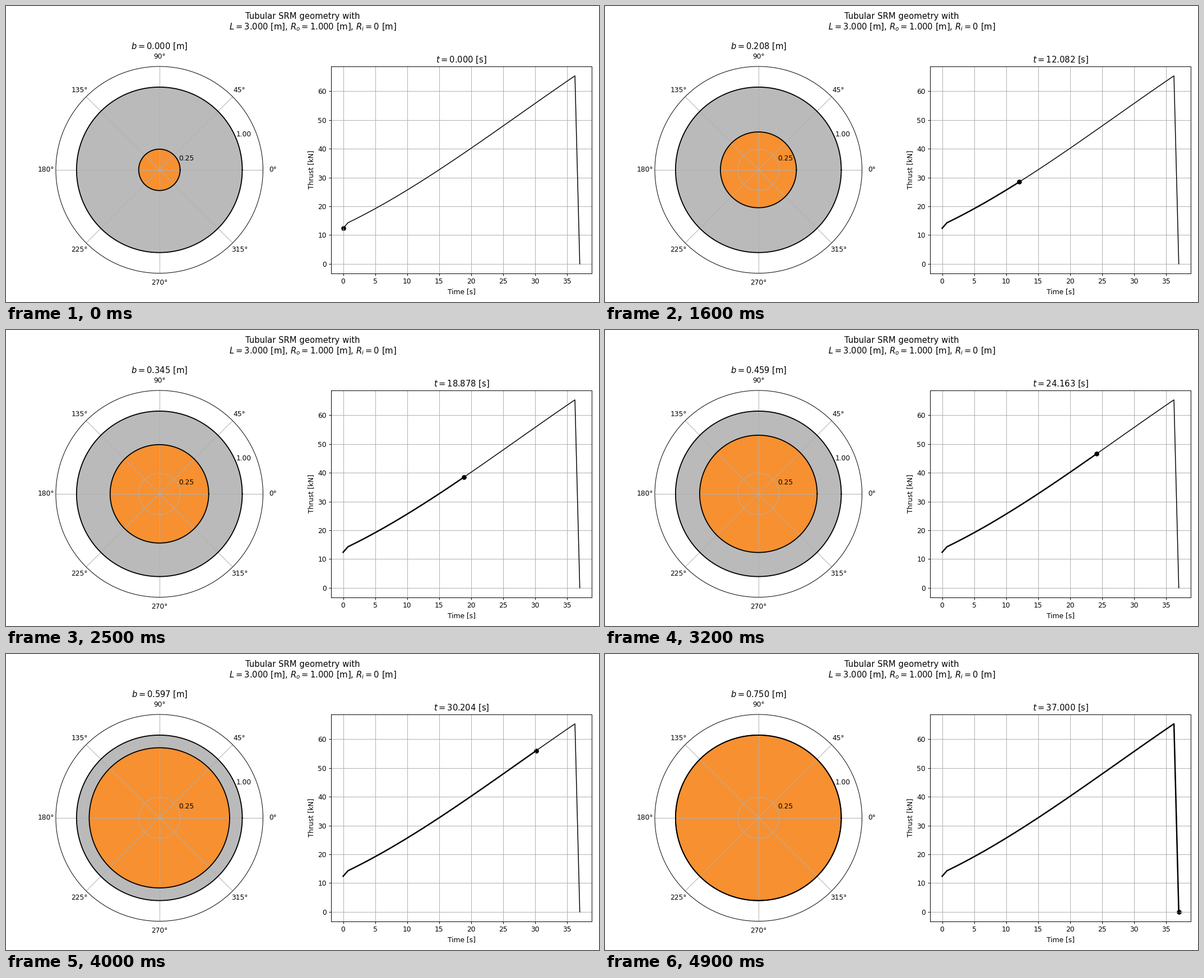
These frames come from a looping animation (1058 px wide and 529 px high, 5 s). A matplotlib script:

```python
import numpy as np
import matplotlib.pyplot as plt
from matplotlib.animation import FuncAnimation

W, H = 1058, 529
FRAMES = 50
T_END = 37.0
R_PORT, R_OUT = 0.25, 1.0
GREY, ORANGE = "#bababa", "#f79030"

plt.rcParams["font.family"] = "DejaVu Sans"


def curve(t, values, deg, at):
    """Evaluate a polynomial fitted through a few points."""
    return np.polyval(np.polyfit(np.array(t) / T_END, values, deg), at / T_END)


# burn time, thrust and burnt depth
time = np.linspace(0, T_END, FRAMES)

thrust = curve(time[[1, 8, 16, 25, 32, 40, 48]],
               [14.27, 20.5, 28.5, 38.45, 46.6, 56.1, 65.35], 3, time)
thrust[0], thrust[-1] = 12.37, 0.0

depth = curve(time[[0, 8, 16, 25, 32, 40, 48]],
              [0, 0.0983, 0.2083, 0.3448, 0.4589, 0.5972, 0.742], 6, time)
depth[0], depth[-1] = 0.0, R_OUT - R_PORT

fig = plt.figure(figsize=(12, 6), dpi=W / 12)
fig.suptitle("Tubular SRM geometry with\n"
             "        $L = 3.000$ [m], $R_o = 1.000$ [m], $R_i = 0$ [m]")


def add_axes(x, y, w, h, **kw):
    """Axes from a pixel box measured from the top left."""
    return fig.add_axes([x / W, 1 - (y + h) / H, w / W, h / H], **kw)


# grain cross-section
grain = add_axes(88.9, 108, 369.6, 369.6, projection="polar")
theta = np.linspace(0, 2 * np.pi, 361)
ring = np.ones_like(theta)
grain.fill(theta, R_OUT * ring, color=GREY, lw=0)
(port,) = grain.fill(theta, R_PORT * ring, color=ORANGE, lw=0)
grain.plot(theta, R_OUT * ring, "k", lw=1.5)
(edge,) = grain.plot(theta, R_PORT * ring, "k", lw=1.5)
grain.set_ylim(0, 1.25)
grain.set_yticks([R_PORT, R_OUT])
grain.grid(True)

# thrust history
chart = add_axes(580.4, 108, 464.4, 369.6)
chart.plot(time, thrust, "k", lw=1.2)
(trail,) = chart.plot([], [], "k", lw=2)
dot = chart.scatter([time[0]], [thrust[0]], c="k")
chart.set_xlim(-0.05 * T_END, 1.05 * T_END)
chart.set_ylim(-0.05 * thrust.max(), 1.05 * thrust.max())
chart.set_xlabel("Time [s]")
chart.set_ylabel("Thrust [kN]")
chart.grid(True)

grain_title = grain.set_title("")
chart_title = chart.set_title("")


def update(i):
    r = (R_PORT + depth[i]) * ring
    port.set_xy(np.column_stack([theta, r]))
    edge.set_data(theta, r)
    trail.set_data(time[:i + 1], thrust[:i + 1])
    dot.set_offsets([[time[i], thrust[i]]])
    grain_title.set_text(f"$b = {depth[i]:.3f}$ [m]")
    chart_title.set_text(f"$t = {time[i]:.3f}$ [s]")
    return port, edge, trail, dot, grain_title, chart_title


anim = FuncAnimation(fig, update, frames=FRAMES, interval=100,
                     repeat=True, repeat_delay=0, blit=False)
plt.show()
```
